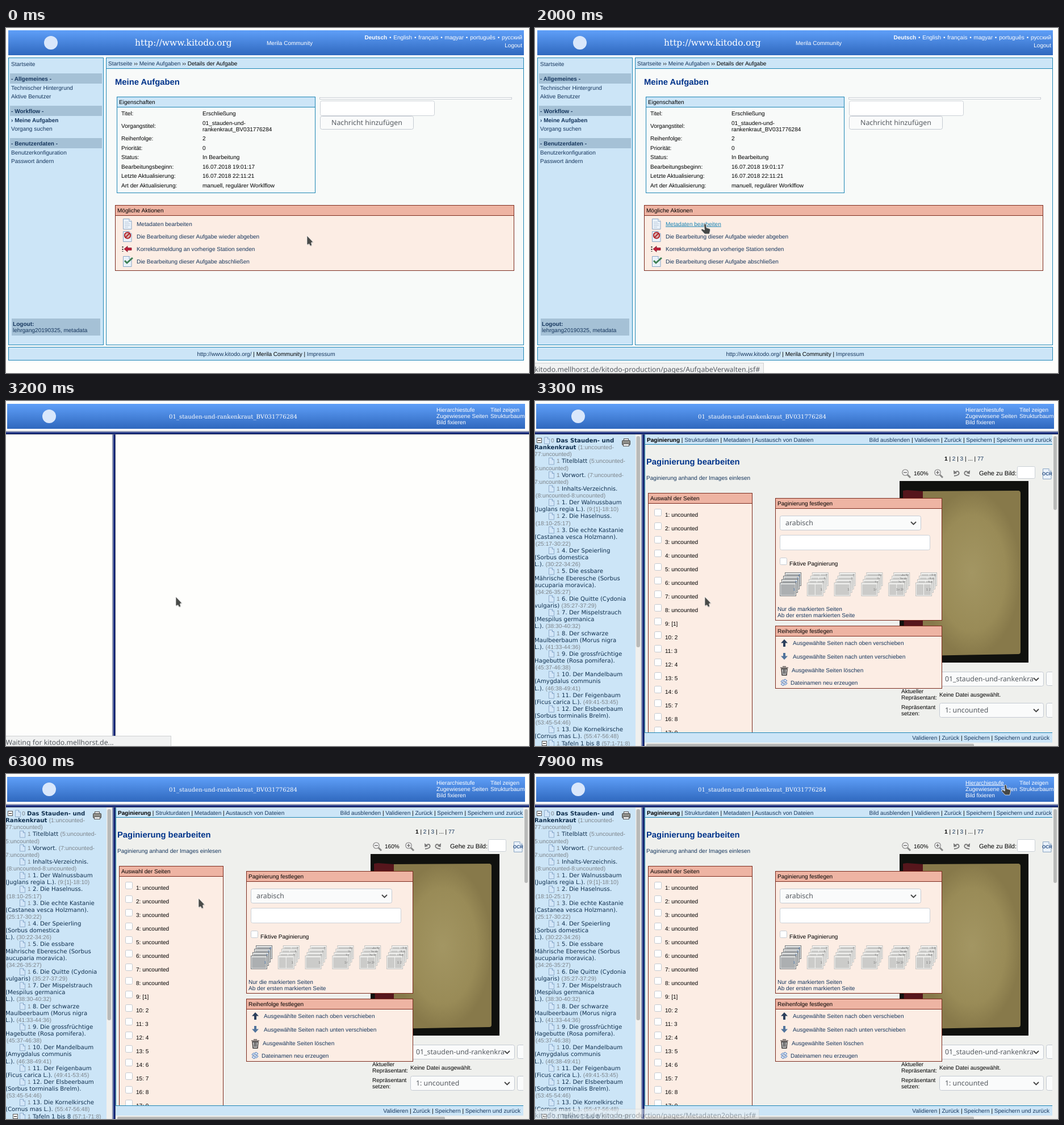
An HTML page for the animation above (8000 ms loop, 921 by 608 pixels).

```html
<!DOCTYPE html>
<html lang="de">
<head>
<meta charset="utf-8">
<title>Paginierung</title>
<style>
html, body { margin: 0; width: 100%; height: 100%; overflow: hidden; background: #fefefc; }
svg { display: block; width: 921px; height: 608px; text-rendering: geometricPrecision; }
text { font: 10.05px "Liberation Sans", Arial, sans-serif; white-space: pre; }
.l { fill: #17375e; }
.w { fill: #fff; }
.b { font-weight: bold; }
.end { text-anchor: end; }
.mid { text-anchor: middle; }
.h { font-weight: bold; font-size: 14.8px; fill: #00338a; }
.ui { font: 12.3px "Noto Sans", "Open Sans", sans-serif; fill: #555a60; }
.serif { font: 10.1px "DejaVu Serif", serif; fill: #fff; }
.tree { font: 10.2px "DejaVu Sans", sans-serif; fill: #10304f; }
.tree .g { font: 10.25px "Liberation Sans", Arial, sans-serif; fill: #7c8389; }
.tiny { font-size: 6px; fill: #777; }
.hover { text-decoration: underline; }
#task.hover { fill: #1c85b5; }
</style>
</head>
<body>
<svg id="stage" viewBox="0 0 921 608"></svg>
<script>
const BLUE = '#1c85b5', PALE = '#cce5f7', RUST = '#7c2b1e', CREAM = '#fcede4', PINK = '#eeb4a3';
const HOST = 'kitodo.mellhorst.de', PROCESS = '01_stauden-und-rankenkraut_BV031776284';

// y is the vertical middle of the text line
const text = (x, y, s, cls = '', more = '') => `<text x="${x}" y="${y + 3.6}" class="${cls}" ${more}>${s}</text>`;
const link = s => `<tspan class="l">${s}</tspan>`;
const rect = (x, y, w, h, fill, stroke = '', r = 0) => stroke
  ? `<rect x="${x + .5}" y="${y + .5}" width="${w - 1}" height="${h - 1}" rx="${r}" fill="${fill}" stroke="${stroke}"/>`
  : `<rect x="${x}" y="${y}" width="${w}" height="${h}" rx="${r}" fill="${fill}"/>`;
const path = (d, fill, stroke = 'none', w = 1, more = '') =>
  `<path d="${d}" fill="${fill}" stroke="${stroke}" stroke-width="${w}" ${more}/>`;
const at = (x, y, s) => `<g transform="translate(${x} ${y})">${s}</g>`;
const group = (id, s) => `<g id="${id}">${s}</g>`;
const logo = (x, y) => `<circle cx="${x}" cy="${y}" r="12" fill="#d9e7fb"/>`;
const field = (x, y, w, h) => rect(x, y, w, h, '#fff', '#cbd0d6', 3);
const box = (x, y, w, h, title, head, body, line) =>
  rect(x, y, w, h, body, line) + rect(x, y, w, 19, head, line) + text(x + 4, y + 9, title);
const select = (x, y, w, s) => rect(x, y, w, 26, '#fafbfb', '#c4cad2', 3) + text(x + 10, y + 13.5, s, 'ui') +
  path(`M${x + w - 18} ${y + 11}l4.5 4.5l4.5-4.5`, 'none', '#444', 1.8);
const sheet = path('M.5.5H11L15 4.5V18.5H.5Z', '#eaf2fa', '#8ba6c4') + path('M11 .5V4.5H15', '#fff', '#8ba6c4');
const header = (x, y, w) => rect(x, y, w, 44, 'url(#sky)');

function taskPage() {
  let s = rect(0, 0, 921, 608, '#fefefc') + header(4, 4, 908) + logo(79, 26) +
    text(227, 27.5, 'http://www.kitodo.org', 'serif', 'style="font-size:15.45px"') +
    text(459, 26, 'Merila Community', 'w') +
    text(909, 16, '<tspan class="b">Deutsch</tspan> • English • français • magyar • português • русский', 'w end', 'style="word-spacing:1px"') +
    text(909, 30.5, 'Logout', 'w end');

  s += rect(4, 52, 168, 507, PALE, BLUE);
  for (const [y, head] of [[80, 'Allgemeines'], [137, 'Workflow'], [194, 'Benutzerdaten']])
    s += rect(7, y, 162, 18, '#a5c1d6') + text(9, y + 9, `- ${head} -`, 'l b');
  for (const [y, item, cls = ''] of [[63, 'Startseite'], [105, 'Technischer Hintergrund'], [120, 'Aktive Benutzer'],
    [162, '› Meine Aufgaben', 'b'], [177, 'Vorgang suchen'], [219, 'Benutzerkonfiguration'], [234, 'Passwort ändern']])
    s += text(9, y, item, 'l ' + cls);
  s += rect(10, 512, 156, 30, '#a5c1d6') + text(12, 521, 'Logout:', 'l b') + text(12, 532, 'lehrgang20190325, metadata', 'l');

  s += rect(176, 52, 736, 507, '#f8faf9', BLUE) + rect(176, 52, 736, 20, PALE, BLUE) +
    text(180, 62, `${link('Startseite')} ›› ${link('Meine Aufgaben')} ›› Details der Aufgabe`) +
    text(192, 96, 'Meine Aufgaben', 'h') +
    box(195, 121, 350, 170, 'Eigenschaften', PALE, '#f8faf9', BLUE);
  const [first, second] = PROCESS.split(/(?<=und-)/);
  for (const [y, key, value] of [[150, 'Titel:', 'Erschließung'], [172, 'Vorgangstitel:', ''], [194.5, 'Reihenfolge:', '2'],
    [211, 'Priorität:', '0'], [227.5, 'Status:', 'In Bearbeitung'], [244, 'Bearbeitungsbeginn:', '16.07.2018 19:01:17'],
    [260.5, 'Letzte Aktualisierung:', '16.07.2018 22:11:21'], [277.5, 'Art der Aktualisierung:', 'manuell, regulärer Worklflow']])
    s += text(203, y, key) + text(346, y, value);
  s += text(346, 167, first) + text(346, 178, second) +
    rect(552, 122, 339, 4, '#fff', '#c9ced4') + field(553, 128, 202, 27) +
    rect(553, 155, 165, 24, '#fafbfb', '#c4cad2', 3) + text(635.5, 167.5, 'Nachricht hinzufügen', 'ui mid');

  s += box(192, 312, 703, 116, 'Mögliche Aktionen', PINK, CREAM, RUST);
  s += at(206, 336, sheet + path('M3 6H10M3 9H12M3 12H12M3 15H9', 'none', '#b9c7d8')) +
    at(206, 358, sheet + '<circle cx="8" cy="7.5" r="5.2" fill="#d9b7b4" stroke="#b3262c" stroke-width="2"/>' + path('M4.5 11L11.5 4', 'none', '#b3262c', 2)) +
    path('M205.5 385v9', 'none', '#222', 2, 'stroke-dasharray="2"') +
    path('M208 389.5l6-5v3h7v4h-7v3z', '#c01f3a', '#7d1727', .8) +
    at(206, 402, sheet + path('M3 8l4 4L17 3', 'none', '#3f8055', 3));
  s += text(230, 345, 'Metadaten bearbeiten', 'l', 'id="task"') +
    text(230, 367, 'Die Bearbeitung dieser Aufgabe wieder abgeben', 'l') +
    text(230, 389, 'Korrekturmeldung an vorherige Station senden', 'l') +
    text(230, 411, 'Die Bearbeitung dieser Aufgabe abschließen', 'l') +
    group('focus', `<rect x="198.5" y="335.5" width="129" height="19" fill="none" stroke="${BLUE}" stroke-dasharray="1"/>`) +
    rect(4, 562, 908, 24, PALE, BLUE) +
    text(458, 574, `${link('http://www.kitodo.org/')} | Merila Community | ${link('Impressum')}`, 'mid');
  return s + group('tip', '<rect x="297" y="361" width="147" height="37" rx="5" fill="#000" fill-opacity=".8"/>' +
    text(370.5, 380, 'Metadaten bearbeiten', 'ui mid', 'style="fill:#fff"'));
}

// "*" marks a line with a page icon, braces hold grey page ranges
const TREE = `{0} <tspan class="b">Das Stauden- und</tspan>
<tspan class="b">Rankenkraut</tspan> {(1:uncounted-}
{77:uncounted)}
*Titelblatt {(5:uncounted-}
{5:uncounted)}
*Vorwort. {(7:uncounted-}
{7:uncounted)}
*Inhalts-Verzeichnis.
{(8:uncounted-8:uncounted)}
*1. Der Walnussbaum
(Juglans regia L.). {(9:[1]-18:10)}
*2. Die Haselnuss.
{(18:10-25:17)}
*3. Die echte Kastanie
(Castanea vesca Holzmann).
{(25:17-30:22)}
*4. Der Speierling
(Sorbus domestica
L.). {(30:22-34:26)}
*5. Die essbare
Mährische Eberesche (Sorbus
aucuparia moravica).
{(34:26-35:27)}
*6. Die Quitte (Cydonia
vulgaris) {(35:27-37:29)}
*7. Der Mispelstrauch
(Mespilus germanica
L.). {(38:30-40:32)}
*8. Der schwarze
Maulbeerbaum (Morus nigra
L.). {(41:33-44:36)}
*9. Die grossfrüchtige
Hagebutte (Rosa pomifera).
{(45:37-46:38)}
*10. Der Mandelbaum
(Amygdalus communis
L.). {(46:38-49:41)}
*11. Der Feigenbaum
(Ficus carica L.). {(49:41-53:45)}
*12. Der Elsbeerbaum
(Sorbus torminalis Brelm).
{(53:45-54:46)}
*13. Die Kornelkirsche
(Cornus mas L.). {(55:47-56:48)}
*Tafeln 1 bis 8 {(57:1-71:8)}`.split('\n');

const leaf = (x, y) => at(x, y - 6, path('M.5.5H6.5L9.5 3.5V12H.5Z', '#d3e6f8', '#7f9fc0', .8) + path('M6.5.5V3.5H9.5', '#fff', '#4f7fb5', .8));
const knob = (x, y) => rect(x, y - 4, 9, 9, '#fff', '#555') + path(`M${x + 2} ${y + .5}h5`, 'none', '#000');

function tree() {
  let s = rect(0, 59, 177, 549, PALE) + rect(177, 59, 10, 549, '#f0f0ee') + rect(178.5, 62, 6.5, 372, '#b9bab9', '', 3);
  TREE.forEach((line, i) => {
    const y = 69.5 + 12.125 * i, icon = line[0] === '*';
    const x = icon ? 38 : i === 0 ? 28 : line.startsWith('{(') ? 1 : -1;
    if (icon) s += leaf(24, y);
    s += text(x, y, line.replace('*', '{1} ').replace(/\{(.*?)\}/g, '<tspan class="g">$1</tspan>'), 'tree');
  });
  return s + knob(3, 69) + leaf(16, 69.5) + knob(12, 603) +
    rect(153, 69, 15, 9, '#8d8d88', '#444', 1) + rect(156, 66, 9, 4, '#eee', '#555') + rect(155, 75, 11, 5, '#eee', '#555');
}

function stack(x, labels, strong) {
  const [edge, paper, ink] = strong ? ['#75797c', '#e8eaea', '#acafb1'] : ['#c2c2c0', '#f4f4f2', '#cbcbc9'];
  const spread = labels[3] !== labels[2] && !strong && labels[0] !== '1r';
  let s = '';
  for (let i = 3; i >= 0; i--) {
    const sx = x + 3 * i, sy = 320 - 6 * i;
    s += rect(sx, sy, 29, 24, paper, edge) + rect(sx + 2, sy + 3, 25, 19, ink) +
      (spread ? rect(sx + 14, sy + 2, 1, 20, paper) : '') +
      text(sx + 27, sy + (i ? 3.5 : 10), labels[i], 'tiny end', strong ? 'style="fill:#3767a8"' : '');
  }
  return s;
}

const lens = (x, y, sign) => path(`M${x + 4} ${y + 4}l5 5`, 'none', '#8a8a8a', 3) +
  `<circle cx="${x}" cy="${y}" r="5.2" fill="#f4f4f4" stroke="#8a8a8a" stroke-width="1.3"/>` + path(sign, 'none', '#555', 1.2);
const turn = path('M1 11Q11 10 9.5 5Q8 1.5 4 4', 'none', '#777', 1.8) + path('M0 1L.5 8L6.5 6Z', '#777');
const check = (x, y) => rect(x, y, 13, 13, '#fff', '#c5cad0', 2);

function editor() {
  const bar = items => items.map(link).join(' | ');
  let s = rect(193, 59, 718, 549, '#eff0ed') + rect(193, 59, 718, 18, PALE) + rect(193, 76, 718, 1, BLUE) +
    rect(193, 59, 1, 525, BLUE) +
    text(197, 68, `<tspan class="b">Paginierung</tspan> | ${bar(['Strukturdaten', 'Metadaten', 'Austausch von Dateien'])}`) +
    text(910, 68, bar(['Bild ausblenden', 'Validieren', 'Zurück', 'Speichern', 'Speichern und zurück']), 'end') +
    text(196, 108, 'Paginierung bearbeiten', 'h') +
    text(196, 135, 'Paginierung anhand der Images einlesen', 'l');

  s += box(199, 162, 184, 450, 'Auswahl der Seiten', PINK, CREAM, RUST);
  for (let n = 1; n <= 17; n++) {
    const y = 176 + 24 * n, label = n < 9 ? 'uncounted' : n === 9 ? '[1]' : n - 8;
    s += check(210, y - 10) + text(229, y, `${n}: ${label}`);
  }

  s += text(721, 101, `<tspan class="b">1</tspan> | ${bar(['2', '3'])} | ... | ${link('77')}`) +
    lens(652, 126, 'M649 126h6') + text(667, 127, '160%') + lens(709, 126, 'M706 126h6M709 123v6') +
    at(737, 121, turn) + `<g transform="translate(766 121) scale(-1 1)">${turn}</g>` +
    text(782, 127, 'Gehe zu Bild:', '', 'style="font-size:11px"') + rect(849, 115, 32, 22, '#fff', '#cbd0d6', 2) +
    at(894, 119, sheet) + text(893, 127, 'OCR', 'b', 'style="font-size:8px;fill:#234a80"');

  // scanned cover
  s += rect(642, 141, 227, 320, '#10110e') + path('M648 158L655 157L683 159V449L650 452Z', '#56161c') +
    path('M683 159L852 158Q855 159 855 162V442Q855 446 851 446L683 449Z', 'url(#cover)');

  s += select(712, 477, 184, PROCESS.slice(0, 24)) + select(712, 532, 184, '1: uncounted') +
    rect(900, 477, 30, 25, '#fafbfb', '#c4cad2', 3) + rect(900, 532, 30, 26, '#fafbfb', '#c4cad2', 3) +
    text(645, 511.5, 'Aktueller') + text(645, 522.5, 'Repräsentant:') + text(712, 517, 'Keine Datei ausgewählt.') +
    text(645, 539.5, 'Repräsentant') + text(645, 550.5, 'setzen:');

  s += box(423, 171, 294, 216, 'Paginierung festlegen', PINK, CREAM, RUST) + select(431, 202, 249, 'arabisch') +
    field(431, 236, 265, 27) + check(431, 276) + text(448, 286, 'Fiktive Paginierung');
  ['1,2,3,4', '1,3,5,7', '1,1,2,2', '1r,1v,2r,2v', '1v 2r,2v 3r,3v 4r,4v 5r', '1 2,3 4,5 6,7 8']
    .forEach((marks, i) => s += stack(431 + 47.8 * i, marks.split(','), i === 0));
  s += text(427, 366, 'Nur die markierten Seiten', 'l') + text(427, 377, 'Ab der ersten markierten Seite', 'l');

  s += box(423, 396, 294, 111, 'Reihenfolge festlegen', PINK, CREAM, RUST) +
    path('M439 420l6 6.5h-4V433h-4v-6.5h-4z', '#2c405c') + path('M439 456l6-6.5h-4V444h-4v5.5h-4z', '#52749c') +
    path('M434 472l1 11h8l1-11z', '#fff', '#222', 1.3) + path('M432 470H446M436 468h6M437 473v8M439 473v8M441 473v8', 'none', '#222', 1.2) +
    path('M433 495q1-4 6-3l1-2l4 3l-4 3v-2q-4-1-5 2zM444 497q-1 4-6 3l-1 2l-4-3l4-3v2q4 1 5-2z', '#dce8f8', '#4773b4', .9) +
    text(454, 426, 'Ausgewählte Seiten nach oben verschieben', 'l') + text(454, 450, 'Ausgewählte Seiten nach unten verschieben', 'l') +
    text(452, 474, 'Ausgewählte Seiten löschen', 'l') + text(450, 496, 'Dateinamen neu erzeugen', 'l');

  s += rect(193, 584, 718, 18, PALE) + rect(193, 584, 718, 1, BLUE) +
    text(906, 593, bar(['Validieren', 'Zurück', 'Speichern', 'Speichern und zurück']), 'end') +
    rect(193, 602, 718, 6, '#f0f0ee') + rect(196, 604, 577, 6, '#b9bab9', '', 2);
  return `<g clip-path="url(#pane)">${s}</g>` +
    rect(911, 59, 10, 549, '#f0f0ee') + rect(913, 62, 6, 130, '#b9bab9', '', 3);
}

function metaPage() {
  const top = header(2, 5, 912) + logo(76, 27) + text(400, 27, PROCESS, 'serif mid') +
    text(758, 15, 'Hierarchiestufe', 'w', 'id="level"') + text(758, 26, 'Zugewiesene Seiten', 'w') + text(758, 37, 'Bild fixieren', 'w') +
    text(853, 15, 'Titel zeigen', 'w') + text(853, 26, 'Strukturbaum', 'w');
  let seams = '';
  for (const [o, size, c] of [[0, 1, '#5f6a8c'], [1, 1, '#c3cce4'], [2, 3, '#15297a'], [5, 1, '#4a5370']])
    seams += rect(187 + o, 59, size, 549, c) + rect(0, 53 + o, 921, size, c);
  return rect(0, 0, 921, 608, '#fefefc') + group('top', top) + group('work', tree() + editor()) + seams;
}

stage.innerHTML = `<defs>
  <linearGradient id="sky" x2="0" y2="1"><stop stop-color="#5f9ff8"/><stop offset="1" stop-color="#2f68be"/></linearGradient>
  <radialGradient id="cover"><stop stop-color="#a39663"/><stop offset=".7" stop-color="#998b57"/><stop offset="1" stop-color="#87794a"/></radialGradient>
  <clipPath id="pane"><rect x="193" y="59" width="718" height="549"/></clipPath></defs>` +
  group('taskView', taskPage()) + group('metaView', metaPage()) +
  group('status', '<rect id="panel" x="-2" y="590.5" height="30" fill="#f1f2f2" stroke="#cfd1d2"/>' + text(-.5, 602, '', 'ui', 'id="note"')) +
  group('cursor', group('arrow', path('M1 1L11.5 12L8 13.5L9 18L6 19L4.5 15.5L1 17Z', '#000', 'none', 0, 'opacity=".18"') +
    path('M0 0L10.5 11L7.5 12.3L8.5 17L5.5 18L4 14.5L0 16Z', '#494b49', '#f6f6f6', .7)) +
    group('hand', path('M-1.5 1Q.5-1 2 1L3 7L8 8.5Q10 9 9.5 12L8 18H0L-6 11.5Q-7 9-4.5 9L-.5 11Z', '#454745', '#f2f2f2', .8)));

// each run starts at a time and moves once every 100 ms
const RUNS = [
  [0, '530,366'],
  [600, '512,362 478,350 436,332 394,325 360,338 345,345 331,352 315,354 304,353'],
  [1500, '303,350 301,348 300,346 299,345'],
  [4300, '315,345 333,322 344,300 347,280 347,258 345,240 342,226 340,221'],
  [6300, '339,219 334,200 326,175 318,145'],
  [6800, '308,143 300,140 340,128 424,109 528,86 650,60 765,37 850,21 834,20'],
  [7700, '830,20 829,19 828,19']
].map(([start, points]) => [start, points.split(' ')]);

function cursorAt(t) {
  const [start, points] = RUNS.findLast(run => run[0] <= t);
  return points[Math.min(points.length - 1, Math.floor((t - start) / 100))];
}

function statusAt(t) {
  const page = name => `${HOST}/kitodo-production/pages/${name}.jsf#`;
  const fade = start => Math.min(1, Math.floor((t - start) / 100) * .2 + .1);
  if (t >= 7700) return [page('Metadaten2oben'), 395, fade(7700)];
  if (t >= 3500 && t < 3700) return [`Transferring data from ${HOST}...`, 291, 1];
  if (t >= 3200 && t < 3300) return [`Waiting for ${HOST}...`, 291, 1];
  if (t >= 3000 && t < 3200) return [`Transferring data from ${HOST}...`, 291, 1];
  if (t >= 1500 && t < 3000) return [page('AufgabeVerwalten'), 403, fade(1500)];
  return ['', 0, 0];
}

const $ = id => document.getElementById(id);
const show = (id, on) => $(id).style.display = on ? '' : 'none';

function draw() {
  const t = performance.now() % 8000;
  show('taskView', t < 3100);
  show('metaView', t >= 3100);
  show('top', t >= 3200);
  show('work', t >= 3300);
  show('tip', t >= 2200 && t < 2800);
  show('focus', t >= 2800);
  $('task').classList.toggle('hover', t >= 1500);
  $('level').classList.toggle('hover', t >= 7700);

  const [note, width, opacity] = statusAt(t);
  $('note').textContent = note;
  $('panel').setAttribute('width', width + 1.5);
  $('status').setAttribute('opacity', opacity);

  const hand = t >= 7700 || t >= 1500 && t < 3000;
  show('hand', hand);
  show('arrow', !hand);
  $('cursor').setAttribute('transform', `translate(${cursorAt(t)})`);
  requestAnimationFrame(draw);
}
draw();
</script>
</body>
</html>
```
